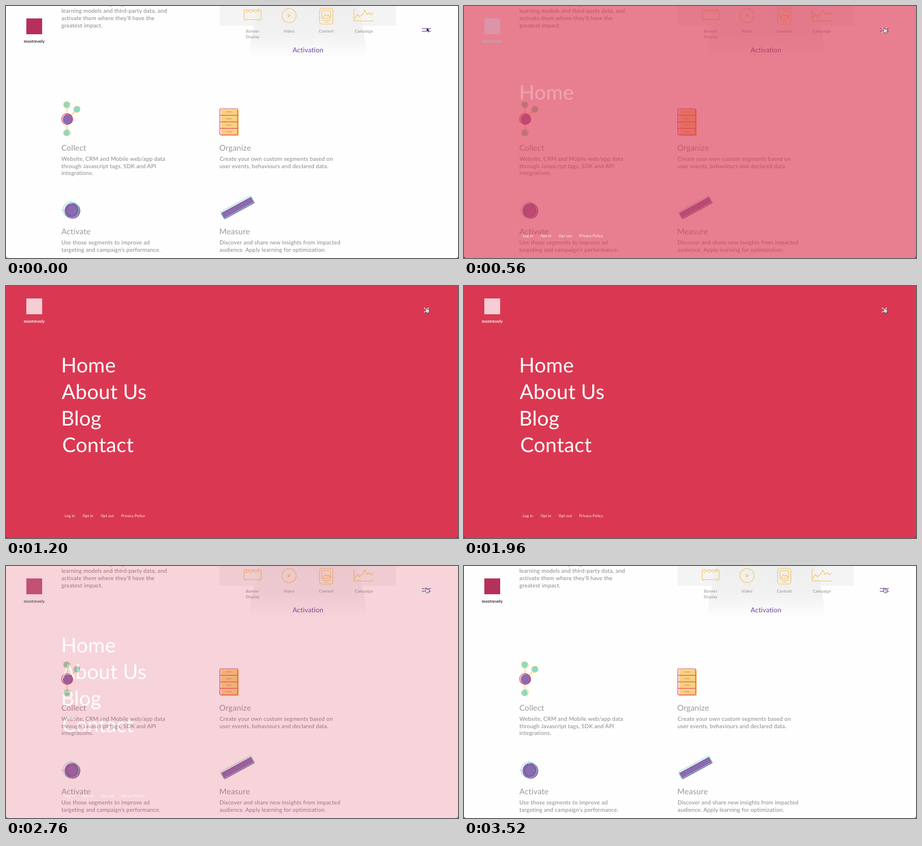
These frames come from a looping animation (800 by 446 pixels, 3.56 s). An HTML page:

```html
<!DOCTYPE html>
<html lang="en">
<head>
<meta charset="utf-8">
<title>Menu overlay</title>
<style>
  :root { --loop: 3560ms; --purple: #8c6ab0; --yellow: #f6c462; --teal: #82dccb; --red: #da3852; }
  html, body { margin: 0; width: 100%; height: 100%; overflow: hidden; background: #fefefe; }
  svg { display: block; width: 800px; height: 446px; font-family: Lato, sans-serif; text-rendering: geometricPrecision; }

  .body { font-size: 10px; letter-spacing: .17px; fill: #888; }
  .head { font-size: 14px; letter-spacing: .15px; fill: #999; }
  .label { font-size: 7px; letter-spacing: .25px; fill: #8a8a8a; text-anchor: middle; }
  .word { font-size: 7.3px; font-weight: 700; letter-spacing: .1px; text-anchor: middle; }
  .items { font-size: 36px; letter-spacing: .25px; fill: #fff; }
  .links { font-size: 6.5px; letter-spacing: .2px; fill: #fff; }
  .line { fill: none; stroke-width: 1.1; stroke-linecap: round; stroke-linejoin: round; }
  .yellow { stroke: var(--yellow); }
  .teal { stroke: var(--teal); }
  .red { stroke: #e2405c; }

  .overlay { animation: overlay var(--loop) infinite; }
  .items text { animation: rise var(--loop) calc(var(--i) * 80ms) infinite backwards; }
  .arrow { animation: arrow var(--loop) step-end infinite; }
  .hand { animation: hand var(--loop) step-end infinite; }

  @keyframes overlay {
    0% { opacity: 0; }
    11.38% { opacity: 0; animation-timing-function: ease; }
    23.17% { opacity: 1; }
    71.85% { opacity: 1; animation-timing-function: ease; }
    83.65%, 100% { opacity: 0; }
  }
  @keyframes rise {
    0% { opacity: 0; transform: translateY(18px); }
    13.48% { opacity: 0; transform: translateY(18px); animation-timing-function: ease; }
    24.72%, 100% { opacity: 1; transform: none; }
  }
  @keyframes arrow { 0% { opacity: 1; } 3.37%, 100% { opacity: 0; } }
  @keyframes hand { 0% { opacity: 0; } 3.37%, 100% { opacity: 1; } }
</style>
</head>
<body>
<svg viewBox="0 0 800 446" xmlns="http://www.w3.org/2000/svg">
  <defs>
    <linearGradient id="fade" x1="0" y1="0" x2="0" y2="1">
      <stop offset="0" stop-color="#efefef"/>
      <stop offset=".5" stop-color="#f1f1f1"/>
      <stop offset="1" stop-color="#fefefe"/>
    </linearGradient>
  </defs>

  <g class="page">
    <rect width="800" height="446" fill="#fefefe"/>

    <!-- Channels panel -->
    <path d="M378 0H690V32q0 3-3 3H381q-3 0-3-3Z" fill="#f4f4f4"/>
    <path d="M447 0H624L637 68V94H432V68Z" fill="url(#fade)"/>
    <g class="line yellow">
      <rect x="421.500" y="7" width="30" height="17" rx="1"/>
      <path d="M424 10q2 3 4 0t4 0 4 0 4 0 4 0 4 0M425 7v-2M447 7v-2M424 24v2M449 24v2"/>
      <circle cx="501" cy="17" r="12.500"/>
      <path d="M499.300 14.500L503.500 17L499.300 19.500Z"/>
      <rect x="555" y="4" width="23.500" height="28" rx="4"/>
      <rect x="559" y="8" width="15.500" height="14" rx="2"/>
      <path d="M561 20l4-5 3 3 2-2 4 4M560 25.500h14M564 28.500h6"/>
      <path d="M616 6V26.500H650M617 22l5-7 4 4 6-6 3-6 4 8 4-3 4 4 3-4"/>
    </g>
    <g class="label">
      <text x="436.500" y="47">Banner</text>
      <text x="436.500" y="57">Display</text>
      <text x="501" y="47">Video</text>
      <text x="567" y="47">Content</text>
      <text x="633.500" y="47">Campaign</text>
    </g>
    <text x="534.500" y="82" font-size="12" text-anchor="middle" letter-spacing=".1" fill="#7445a3">Activation</text>

    <g class="body">
      <text x="183" y="-.7">g</text>
      <text x="204" y="-.7">g</text>
      <text x="98" y="12.300">learning models and third-party data, and</text>
      <text x="98" y="25">activate them where they’ll have the</text>
      <text x="98" y="37.700">greatest impact.</text>

      <text x="98" y="274">Website, CRM and Mobile web/app data</text>
      <text x="98" y="286.700">through Javascript tags, SDK and API</text>
      <text x="98" y="299.400">integrations.</text>

      <text x="378" y="274">Create your own custom segments based on</text>
      <text x="378" y="286.700">user events, behaviours and declared data.</text>

      <text x="98" y="422">Use those segments to improve ad</text>
      <text x="98" y="434.700">targeting and campaign’s performance.</text>

      <text x="378" y="422">Discover and share new insights from impacted</text>
      <text x="378" y="434.700">audience. Apply learning for optimization.</text>
    </g>
    <g class="head">
      <text x="98" y="256">Collect</text>
      <text x="377.500" y="256">Organize</text>
      <text x="98" y="403.500">Activate</text>
      <text x="377.500" y="403.500">Measure</text>
    </g>

    <!-- Collect -->
    <path class="line yellow" d="M108 175V224M109 200L125 183"/>
    <g fill="var(--teal)">
      <circle cx="107" cy="174.500" r="5.500"/>
      <circle cx="126" cy="182.500" r="5.500"/>
      <circle cx="107" cy="224.500" r="5.500"/>
    </g>
    <g class="line yellow">
      <circle cx="108" cy="175" r="5.500"/>
      <circle cx="125" cy="183" r="5.500"/>
      <circle cx="108.500" cy="224" r="5.500"/>
    </g>
    <circle cx="109.500" cy="200.500" r="9.300" fill="var(--purple)"/>
    <circle class="line red" cx="108" cy="200" r="9.600"/>

    <!-- Organize -->
    <rect x="380.500" y="183.500" width="31.500" height="46.500" rx="1.500" fill="#f8d080"/>
    <rect class="line red" x="378.500" y="182" width="31.500" height="46" rx="1.500"/>
    <path class="line red" d="M378.500 193.500h31.500M378.500 205h31.500M378.500 216.500h31.500"/>
    <path class="line" stroke="#e58a55" d="M390 187.500h9M390 199.500h9M390 211h9M390 222.500h9"/>

    <!-- Activate -->
    <circle cx="117.500" cy="362.500" r="14" fill="var(--purple)"/>
    <g class="line teal" stroke-dasharray="2.500 1.500">
      <circle cx="115" cy="361" r="14"/>
      <path d="M98.500 361h6M115 345v6"/>
    </g>
    <circle class="line" cx="117" cy="362" r="9.800" stroke="#73519c" stroke-dasharray="2 1"/>

    <!-- Measure -->
    <g transform="translate(410.500 357.500) rotate(-28.500)">
      <rect x="-30.500" y="-6.500" width="61" height="13" rx="1.500" fill="var(--purple)"/>
      <rect class="line teal" x="-31" y="-8.500" width="61" height="13" rx="1.500" stroke-dasharray="2.500 1.500"/>
      <path class="line" d="M-27-4.500H28" stroke="#73519c" stroke-dasharray=".5 3"/>
    </g>

    <!-- Brand and menu button -->
    <rect x="36" y="22" width="28" height="28" fill="#b5305a"/>
    <text class="word" x="50" y="65" fill="#2c2530">mostrevely</text>
    <path d="M736 39.800h16M736 44.600h16" stroke="#7a4ea5" stroke-width="1.300"/>
  </g>

  <g class="overlay">
    <rect width="800" height="446" fill="var(--red)"/>
    <rect x="36" y="22" width="28" height="28" fill="#f5cdd5"/>
    <text class="word" x="50" y="65" fill="#fff">mostrevely</text>
    <path d="M740 38.500l8 8M748 38.500l-8 8" stroke="#fff" stroke-width="1.200"/>
    <g class="items">
      <text x="97.500" y="153" style="--i:0">Home</text>
      <text x="98.500" y="200" style="--i:1">About Us</text>
      <text x="97.500" y="247" style="--i:2">Blog</text>
      <text x="99.500" y="294" style="--i:3">Contact</text>
    </g>
    <g class="links">
      <text x="104" y="409.300">Log in</text>
      <text x="135.500" y="409.300">Opt in</text>
      <text x="167.500" y="409.300">Opt out</text>
      <text x="204" y="409.300">Privacy Policy</text>
    </g>
  </g>

  <g stroke-linejoin="round">
    <path class="arrow" d="M744.300 38v8l1.900-1.700 1.300 2.900 1.400-.6-1.300-2.800h2.600Z" fill="#111" stroke="#fff" stroke-width=".6"/>
    <g class="hand" stroke="#222" stroke-width=".8">
      <path d="M742.500 39.200q.8-1.200 1.600 0l1 2.200q2.600-.7 4.100.6v3l-.9 2.600h-3.700l-2.900-3.400q.2-1.100 1.700-.4Z" fill="#fff"/>
      <path d="M745.700 43.500v2.200M747.300 43.500v2.200" stroke-width=".5"/>
    </g>
  </g>

  <!-- Rounded window corners -->
  <path d="M0 442.500Q0 446 3.500 446H0ZM800 442.500Q800 446 796.500 446H800Z" fill="#222"/>
</svg>
</body>
</html>
```
